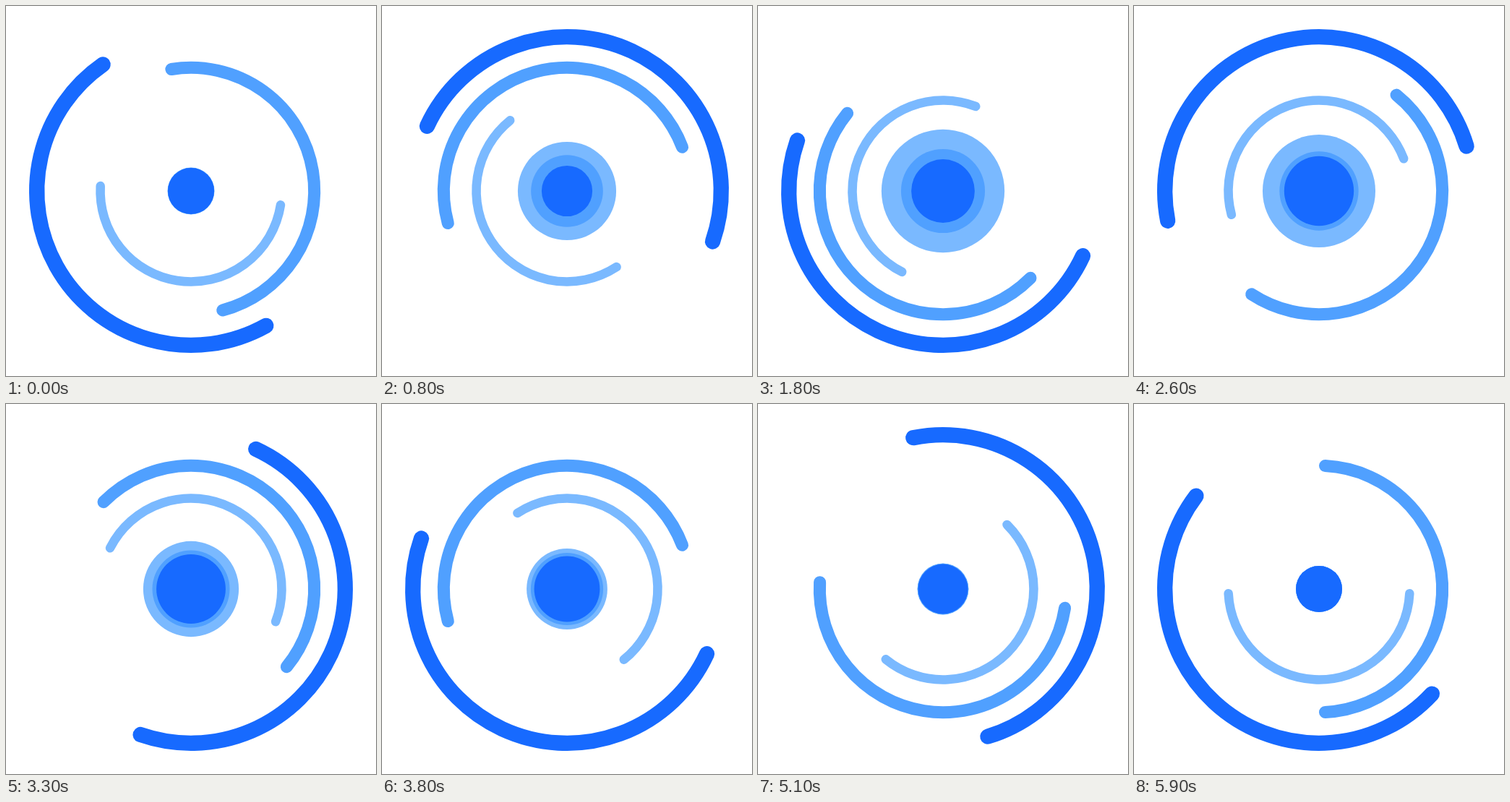
Recreate the animation shown at these times as an HTML page with a canvas. Size 512x512 px, loop 6 s.

```html
<!DOCTYPE html>
<html lang="en">
<head>
<meta charset="utf-8">
<title>Pulse loader</title>
<style>
  html, body { margin: 0; width: 100%; height: 100%; overflow: hidden; background: #fff; }
  canvas { display: block; width: 512px; height: 512px; }
</style>
</head>
<body>
<canvas id="stage" width="512" height="512"></canvas>
<script>
const ctx = document.getElementById('stage').getContext('2d');
const LOOP = 6000, STEP = 100, CENTER = 256, REST = 32;
const DEEP = '#176aff', MID = '#50a0ff', PALE = '#7ab9ff';

// Half rings: start angle in degrees, whole turns per loop
const rings = [
  { radius: 213.33, width: 21.33, color: DEEP, start: 40, turns: 3 },
  { radius: 170.67, width: 17.07, color: MID, start: -90, turns: -2 },
  { radius: 125.5, width: 12.55, color: PALE, start: 0, turns: 1 }
];

// Discs, back to front: [loop fraction, radius]
const discs = [
  { color: PALE, keys: [[0, REST], [0.25, 86], [1, REST]] },
  { color: MID, keys: [[0, REST], [0.25, 58.7], [0.5, 54.3], [1, REST]] },
  { color: DEEP, keys: [[0, REST], [0.5, 48.5], [1, REST]] }
];

// cubic-bezier(.42, 0, .58, 1), solved by bisection
function easeInOut(x) {
  let lo = 0, hi = 1, s = x;
  for (let i = 0; i < 24; i++) {
    s = (lo + hi) / 2;
    const bx = 1.26 * s * (1 - s) ** 2 + 1.74 * s * s * (1 - s) + s ** 3;
    if (bx < x) lo = s; else hi = s;
  }
  return s * s * (3 - 2 * s);
}

function valueAt(keys, p) {
  const i = keys.findIndex(([at]) => at > p);
  const [t0, v0] = keys[i - 1], [t1, v1] = keys[i];
  return v0 + (v1 - v0) * easeInOut((p - t0) / (t1 - t0));
}

function drawRing({ radius, width, color, start, turns }, p) {
  const cap = width / 2 / radius;
  const from = start * Math.PI / 180 + turns * p * 2 * Math.PI;
  ctx.beginPath();
  ctx.arc(CENTER, CENTER, radius, from + cap, from + Math.PI - cap);
  ctx.strokeStyle = color;
  ctx.lineWidth = width;
  ctx.stroke();
}

function drawDisc({ color, keys }, p) {
  ctx.beginPath();
  ctx.arc(CENTER, CENTER, valueAt(keys, p), 0, 2 * Math.PI);
  ctx.fillStyle = color;
  ctx.fill();
}

function draw(ms) {
  // Ten poses per second; the first one is already a step into the cycle
  const pose = Math.floor((ms + 15) / STEP) + 1;
  const p = (pose * STEP % LOOP) / LOOP;
  ctx.fillStyle = '#fff';
  ctx.fillRect(0, 0, 512, 512);
  ctx.lineCap = 'round';
  rings.forEach(ring => drawRing(ring, p));
  discs.forEach(disc => drawDisc(disc, p));
}

const begin = performance.now();
function tick() {
  draw(performance.now() - begin);
  requestAnimationFrame(tick);
}
tick();
</script>
</body>
</html>
```
